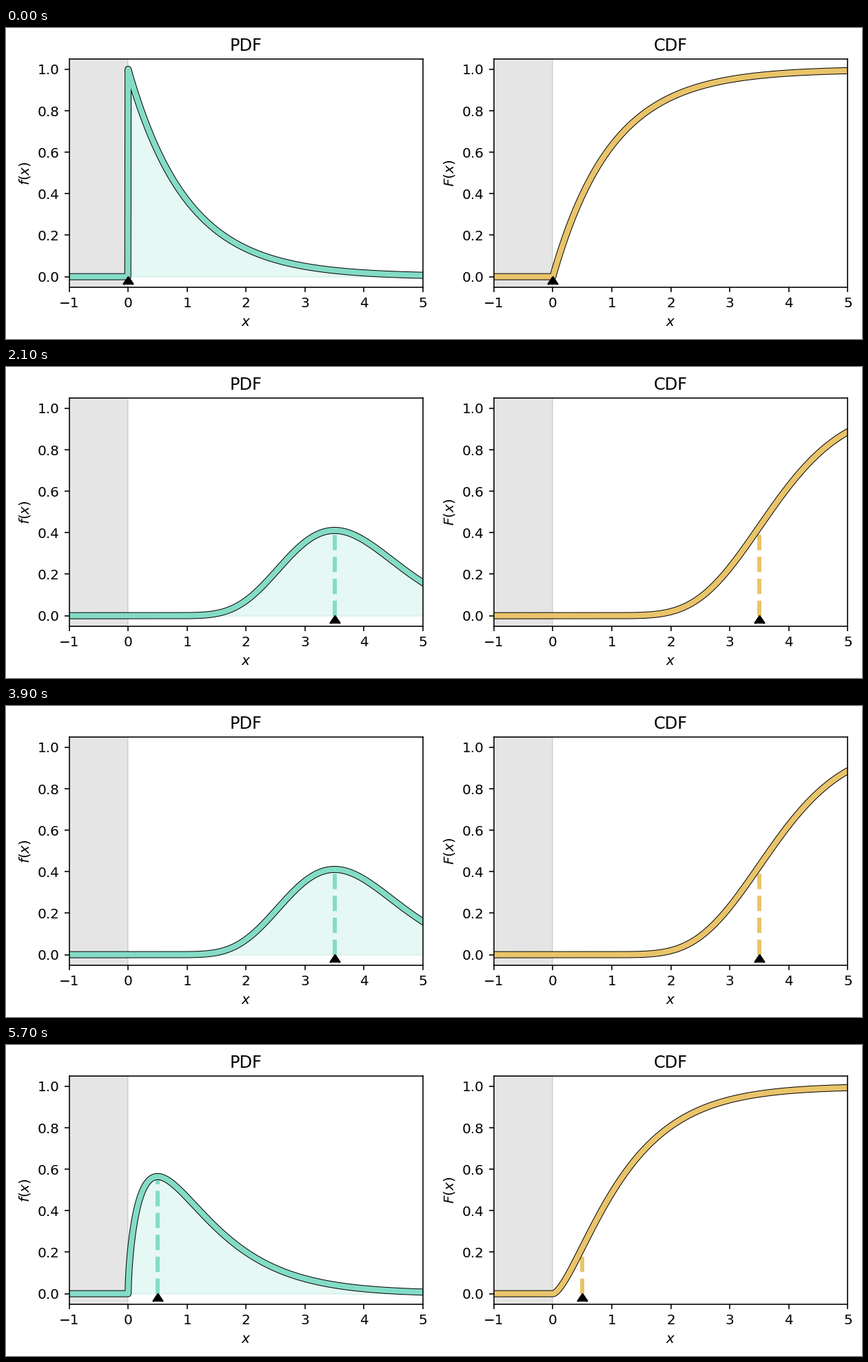
Animation of 1242 by 451 pixels, one loop 6000 ms. Source, as a matplotlib script:

```python
import math

import numpy as np
import matplotlib.pyplot as plt
import matplotlib.patheffects as pe
from matplotlib.animation import FuncAnimation
from matplotlib.markers import CARETUP

W, H, DPI = 1242, 451, 144
FRAMES, INTERVAL = 20, 300
TEAL, GOLD = "#84dcc6", "#e9c46a"
TOP, BOTTOM = 44.8, 375.7

x = np.linspace(-1, 5, 1201)
TERMS = np.arange(160)


def gamma_shape(mode):
    """Root of the shape of a unit-variance gamma with the given mode."""
    return (mode + math.sqrt(mode * mode + 4)) / 2


def pdf(x, mode):
    s = gamma_shape(mode)
    k = s * s
    z = np.maximum(x * s, 1e-12)
    y = s * np.exp((k - 1) * np.log(z) - z - math.lgamma(k))
    return np.where(x >= -1e-9, y, 0)


def cdf(x, mode):
    s = gamma_shape(mode)
    k = s * s
    z = np.maximum(x * s, 1e-12)[:, None]
    norm = np.array([math.lgamma(k + n + 1) for n in TERMS])
    y = np.exp((k + TERMS) * np.log(z) - z - norm).sum(axis=1)
    return np.where(x > 0, y, 0)


fig = plt.figure(figsize=(W / DPI, H / DPI), dpi=DPI, facecolor="white")


def panel(left, right, title, ylabel, color):
    ax = fig.add_axes([left / W, 1 - BOTTOM / H,
                       (right - left) / W, (BOTTOM - TOP) / H])
    ax.set(xlim=(-1, 5), ylim=(-0.05, 1.05), title=title,
           xlabel="$x$", ylabel=ylabel)
    ax.set_xticks(range(-1, 6))
    ax.axvspan(-2, 0, color="black", alpha=0.1)
    stem, = ax.plot([], [], "--", color=color, lw=3)
    curve, = ax.plot([], [], color=color, lw=4, path_effects=[
        pe.Stroke(linewidth=5, foreground="black"), pe.Normal()])
    mark = ax.scatter([0], [0], s=50, marker=CARETUP, color="black", zorder=3)
    return ax, stem, curve, mark


panels = [
    (pdf, panel(91.6, 605.0, "PDF", "$f(x)$", TEAL)),
    (cdf, panel(707.8, 1221.4, "CDF", "$F(x)$", GOLD)),
]
area = panels[0][1][0].fill_between(x, 0 * x, color=TEAL, alpha=0.2, zorder=1)


def draw(i):
    mode = 5 - abs(5 - 0.5 * i)
    for func, (_, stem, curve, mark) in panels:
        top = func(np.array([mode]), mode)[0]
        curve.set_data(x, func(x, mode))
        stem.set_data([mode, mode], [0, top])
        mark.set_offsets([[mode, 0]])
    y = pdf(x, mode)
    outline = np.column_stack([np.r_[x, x[::-1]], np.r_[y, 0 * y]])
    area.set_verts([outline])
    return []


anim = FuncAnimation(fig, draw, frames=FRAMES, interval=INTERVAL,
                     init_func=lambda: draw(0), repeat=True, repeat_delay=0)
plt.show()
```
